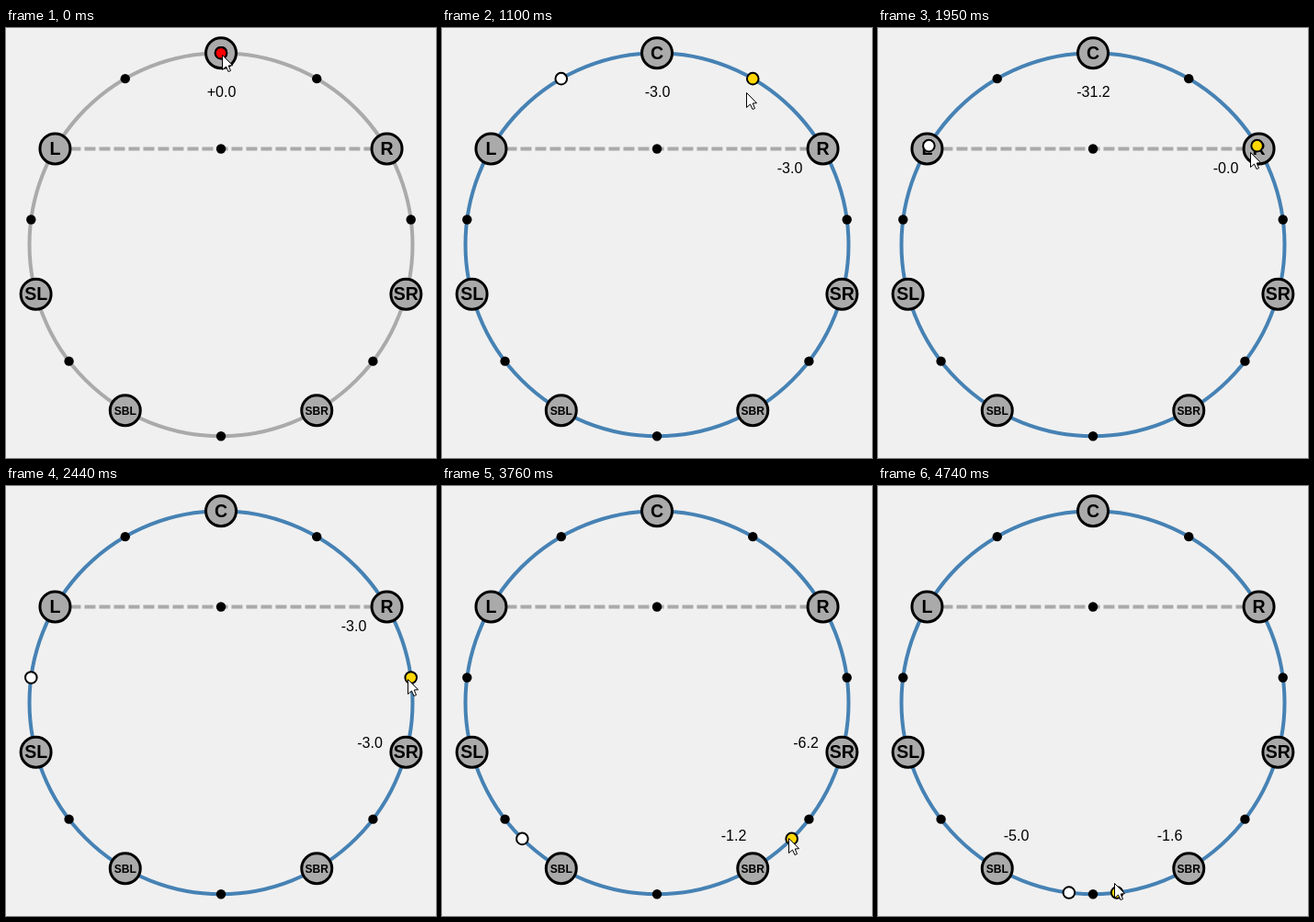
Write an HTML page with a canvas that moves like this. It is 468x468 px and loops after 4840 ms.

```html
<!DOCTYPE html>
<html lang="en">
<head>
<meta charset="utf-8">
<title>Surround panner</title>
<style>
html, body { margin: 0; width: 100%; height: 100%; overflow: hidden; background: #f0f0f0; }
canvas { display: block; width: 468px; height: 468px; }
</style>
</head>
<body>
<canvas id="stage" width="468" height="468"></canvas>
<script>
const ctx = document.getElementById('stage').getContext('2d');
const CX = 234, CY = 235.7, R = 208.5;
const LOOP = 4840, LAST_STEP = 39;
const GREY = '#aaaaaa', BLUE = '#4682b4';

// Clockwise from the top; label is where the gain readout is centred.
const speakers = [
  { name: 'C', angle: 0, label: [234.5, 75] },
  { name: 'R', angle: 60, label: [378.5, 158] },
  { name: 'SR', angle: 105, label: [396, 285] },
  { name: 'SBR', angle: 150, label: [317.5, 386] },
  { name: 'SBL', angle: 210, label: [150.5, 386] },
  { name: 'SL', angle: 255 },
  { name: 'L', angle: 300 }
];

// step, pan angle, pointer radius
const path = [
  [0, 0, 207], [2, 0, 207], [7, 21.3, 196], [9, 30, 192.5], [12, 40, 193],
  [13, 44.4, 193.4], [17, 63.8, 200], [20, 82.5, 204.5], [26, 111.9, 209],
  [27, 114.8, 208.5], [31, 135.3, 205.4], [32, 140.9, 204], [39, 172.8, 198]
];

const arrow = [[0, 0], [0, 16], [4, 12.5], [6.5, 18], [9, 17], [6.7, 11.5], [11, 11.2]];

// Steps last 120 ms, apart from a few that are 10 ms longer or shorter.
const longSteps = [3, 6, 15, 20, 30, 36, 38];
const stepStart = k =>
  120 * k + 10 * longSteps.filter(s => s <= k).length - (k >= 25 ? 10 : 0);

function stepAt(time) {
  let k = LAST_STEP;
  while (k > 0 && stepStart(k) > time) k--;
  return k;
}

function poseAt(step) {
  const i = Math.max(1, path.findIndex(p => p[0] >= step));
  const a = path[i - 1], b = path[i];
  const u = (step - a[0]) / (b[0] - a[0]);
  return { angle: a[1] + (b[1] - a[1]) * u, reach: a[2] + (b[2] - a[2]) * u };
}

function polar(degrees, radius = R) {
  const a = degrees * Math.PI / 180;
  return [CX + radius * Math.sin(a), CY - radius * Math.cos(a)];
}

function disc([x, y], radius, fill, lineWidth) {
  ctx.beginPath();
  ctx.arc(x, y, radius, 0, Math.PI * 2);
  if (fill) {
    ctx.fillStyle = fill;
    ctx.fill();
  }
  if (lineWidth) {
    ctx.lineWidth = lineWidth;
    ctx.stroke();
  }
}

function text(value, x, y, font) {
  ctx.font = font + ' "Liberation Sans", Arial, sans-serif';
  ctx.textAlign = 'center';
  ctx.fillStyle = '#000';
  ctx.fillText(value, x, y);
}

function drawRing(color) {
  ctx.strokeStyle = color;
  disc([CX, CY], R, null, 4);

  const [x1, y] = polar(300), [x2] = polar(60);
  ctx.strokeStyle = GREY;
  ctx.setLineDash([12, 4]);
  ctx.beginPath();
  ctx.moveTo(x1, y);
  ctx.lineTo(x2, y);
  ctx.stroke();
  ctx.setLineDash([]);

  ctx.strokeStyle = '#000';
  disc([CX, y], 5.2, '#000');
  speakers.forEach((s, i) => {
    const next = i + 1 < speakers.length ? speakers[i + 1].angle : 360;
    disc(polar((s.angle + next) / 2), 5.2, '#000');
  });
}

function drawSpeaker({ name, angle }) {
  const [x, y] = polar(angle);
  disc([x, y], 16.5, GREY, 3);
  const small = name.length > 2;
  text(name, x, y + (small ? 4.5 : 6.8), small ? 'bold 12px' : 'bold 19.5px');
}

function drawGain(speaker, gain) {
  const db = 20 * Math.log10(gain);
  text((db < 0 ? '-' : '+') + Math.abs(db).toFixed(1), ...speaker.label, '16px');
}

// Constant-power panning between the two neighbouring speakers.
function drawGains(angle) {
  const i = speakers.findIndex((s, n) => angle < speakers[n + 1].angle);
  const from = speakers[i], to = speakers[i + 1];
  const turn = (angle - from.angle) / (to.angle - from.angle) * Math.PI / 2;
  drawGain(from, Math.cos(turn));
  if (turn > 0) drawGain(to, Math.sin(turn));
}

function drawPointer([x, y]) {
  ctx.beginPath();
  arrow.forEach(([dx, dy]) => ctx.lineTo(Math.round(x) + dx + 0.5, Math.round(y) + dy + 0.5));
  ctx.closePath();
  ctx.fillStyle = '#fff';
  ctx.fill();
  ctx.lineWidth = 1;
  ctx.stroke();
}

function draw(time) {
  const step = stepAt(time);
  const { angle, reach } = poseAt(step);
  const active = step > 0;

  ctx.fillStyle = '#f0f0f0';
  ctx.fillRect(0, 0, 468, 468);
  drawRing(active ? BLUE : GREY);
  speakers.forEach(drawSpeaker);
  drawGains(angle);
  disc(polar(-angle), 6.3, '#fff', 2);
  disc(polar(angle), 6.3, active ? '#ffd700' : '#ff0000', 2);
  drawPointer(polar(angle + 0.4, reach));
}

const start = performance.now();
function tick() {
  draw((performance.now() - start) % LOOP);
  requestAnimationFrame(tick);
}
tick();
</script>
</body>
</html>
```
